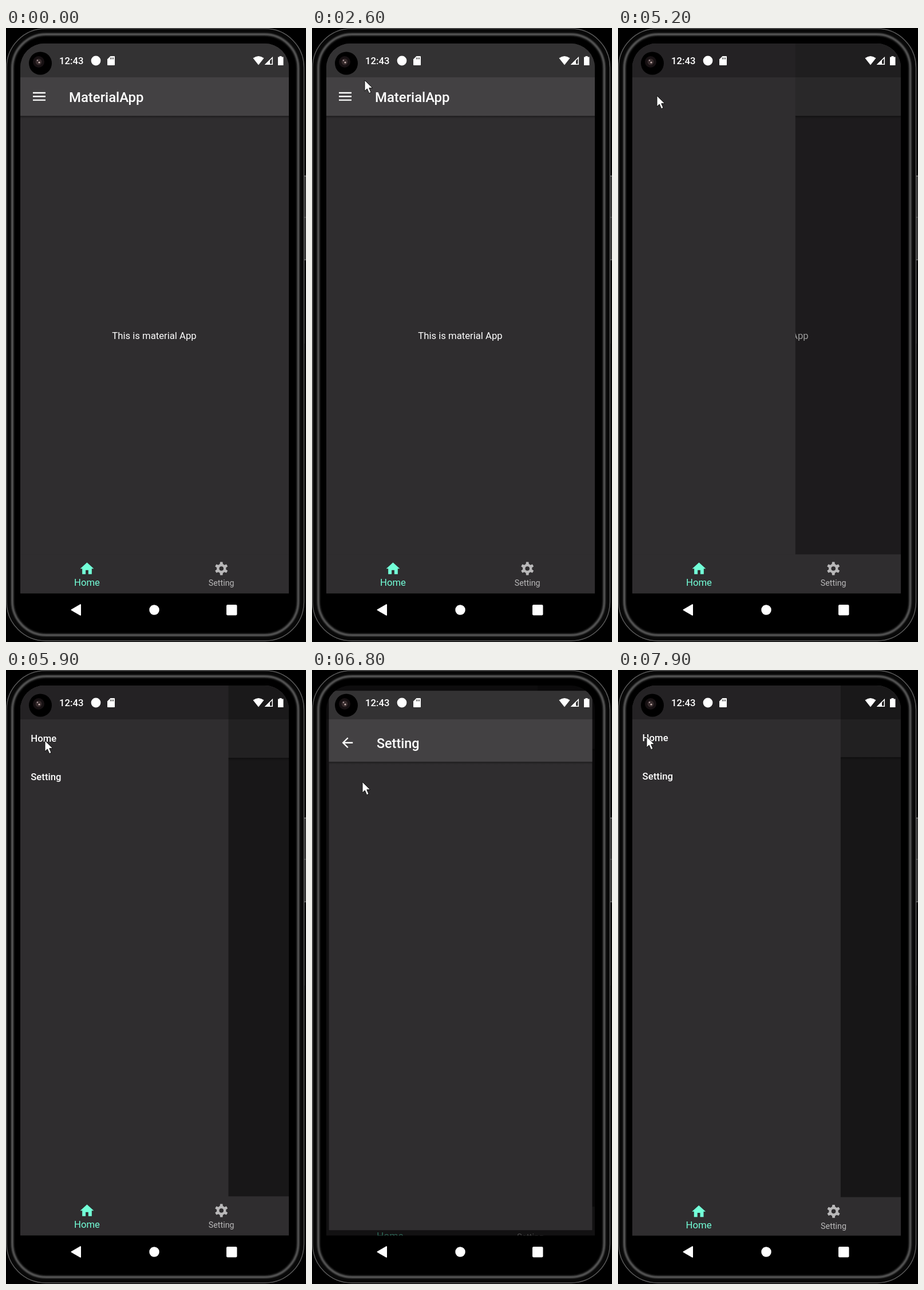
Animation, 524 px wide and 1070 px high, one loop 8000 ms. Source, as an HTML page:

```html
<!DOCTYPE html>
<html lang="en">
<head>
<meta charset="utf-8">
<title>Drawer and tabs</title>
<style>
  html, body { margin: 0; width: 100%; height: 100%; overflow: hidden; background: #000; }
  svg { display: block; font: 16.7px Roboto, sans-serif; fill: #fff; }
  .medium { font-weight: 500; }
  .title { font-weight: 500; font-size: 23.9px; }
  .surface { fill: #2f2d2f; }
  .header { fill: #434143; }
</style>
</head>
<body>
<svg width="524" height="1070">
  <defs>
    <clipPath id="screen"><path d="M25 985.5V69A42 42 0 0 1 67 27H452A42 42 0 0 1 494 69V985.5Z"/></clipPath>
    <linearGradient id="shade" x2="0" y2="1">
      <stop stop-opacity=".35"/><stop offset="1" stop-opacity="0"/>
    </linearGradient>
    <filter id="soft"><feGaussianBlur stdDeviation="1.3"/></filter>
    <path id="tooth" d="M-2.9 -6L-2.2 -11.4H2.2L2.9 -6Z"/>
  </defs>

  <!-- phone body -->
  <g fill="none">
    <rect x="1" y="1" width="519.5" height="1067" rx="68" fill="#080808" stroke="#5a5a5a" stroke-width="1.5"/>
    <rect x="11" y="11" width="499.5" height="1047" rx="59" stroke="#585858" stroke-width="4" filter="url(#soft)"/>
    <rect x="15.5" y="15.5" width="490.5" height="1038" rx="55" fill="#000"/>
    <path d="M522.5 257V329M522.5 331V404" stroke="#4a4a4a" stroke-width="2"/>
    <path d="M521 258H524M521 330H524M521 404H524" stroke="#999"/>
    <path d="M521.5 405V550" stroke="#222"/>
  </g>

  <g clip-path="url(#screen)">
    <g id="app">
      <rect class="surface" x="25" y="27" width="469" height="958.5"/>
      <rect class="header" x="25" y="27" width="469" height="126"/>
      <rect x="25" y="153" width="469" height="5" fill="url(#shade)"/>
      <path d="M47 113H69M47 119.3H69M47 125.6H69" stroke="#fff" stroke-width="2.4"/>
      <text class="title" x="110" y="128.5">MaterialApp</text>
      <text x="259" y="541.5" text-anchor="middle">This is material App</text>
      <rect id="scrim" x="25" y="27" width="469" height="890.5" fill="#000"/>
      <g id="drawer" class="medium">
        <rect class="surface" x="25" y="27" width="363.5" height="891"/>
        <text x="43.3" y="125">Home</text>
        <text x="43.3" y="192">Setting</text>
      </g>
      <rect class="surface" x="25" y="917.5" width="469" height="68"/>
      <g fill="#73ffd8">
        <path transform="translate(127.2 928) scale(1.19)" d="M10 20v-6h4v6h5v-8h3L12 3 2 12h3v8z"/>
        <text x="141.5" y="972" text-anchor="middle">Home</text>
      </g>
      <g fill="#b9b8b9">
        <g id="gear" transform="translate(376.2 942)">
          <circle r="6" fill="none" stroke="#b9b8b9" stroke-width="4.4"/>
        </g>
        <text x="376.2" y="972.3" text-anchor="middle" font-size="14.3">Setting</text>
      </g>
    </g>

    <g id="setting">
      <rect class="surface" x="25" y="27" width="469" height="958.5"/>
      <rect class="header" x="25" y="27" width="469" height="126"/>
      <rect x="25" y="153" width="469" height="5" fill="url(#shade)"/>
      <path transform="translate(43.7 105) scale(1.19)" d="M20 11H7.83l5.59-5.59L12 4l-8 8 8 8 1.41-1.41L7.83 13H20z"/>
      <text class="title" x="110" y="128.5">Setting</text>
    </g>

    <!-- status bar -->
    <rect x="25" y="27" width="469" height="59" fill="#000" opacity=".24"/>
    <text class="medium" x="93" y="63">12:43</text>
    <circle cx="157" cy="57" r="8.4"/>
    <path d="M182.500 49H189Q190 49 190 50V64Q190 65 189 65H178Q177 65 177 64V54.500Z"/>
    <path d="M182.500 51.500V54.500M185 51.500V54.500M187.500 51.500V54.500" stroke="#333" stroke-width="1.200"/>
    <path d="M431.500 52.500Q441 45.500 450.500 52.500L441 64.500Z"/>
    <path d="M453.500 63.300H465.300V51.500Z" fill="none" stroke="#fff" stroke-width="1.500"/>
    <path d="M452 64H461V55Z"/>
    <path d="M477.500 49H481.500V50.500H484.500V65H475V50.500H477.500Z"/>
  </g>

  <!-- camera -->
  <circle cx="60" cy="61.500" r="20" fill="#000"/>
  <circle cx="57" cy="59" r="10" fill="#171113"/>
  <circle cx="57" cy="59" r="5.500" fill="#352a2b"/>
  <circle cx="55" cy="56.500" r="1.200" fill="#a8979a"/>
  <circle cx="58" cy="60" r="1.600" fill="#c8b4b0"/>

  <!-- system navigation -->
  <path d="M114.500 1014L130 1005V1023Z" stroke="#fff" stroke-width="2" stroke-linejoin="round"/>
  <circle cx="259" cy="1014" r="8.700"/>
  <rect x="385" y="1005" width="18.500" height="18.500" rx="2"/>

  <path id="cursor" d="M0 0V19L4.300 14.900 7.700 22.700 11.100 21.200 7.800 13.600H13.800Z" stroke="#111"/>
</svg>
<script>
const $ = id => document.getElementById(id);
const clamp = v => Math.min(1, Math.max(0, v));
const LOOP = 8000, STEP = 100;

for (let a = 0; a < 360; a += 60)
  $('gear').insertAdjacentHTML('beforeend', `<use href="#tooth" transform="rotate(${a})"/>`);

// Pointer paths: [time, x, y]; hidden outside them
const paths = [
  [[2300, 36, 10], [2600, 92, 91], [2900, 361, 930], [3200, 361, 930], [3400, 388, 940]],
  [[3700, 342, 978], [3800, 342, 978], [3900, 340, 895], [4000, 336, 801], [4300, 180, 400],
   [4700, 68, 118], [5800, 68, 118], [5900, 68, 123], [6300, 88, 195], [6800, 88, 195],
   [7400, 50, 116], [LOOP, 50, 116]]
];

function pointer(t) {
  const path = paths.find(p => t >= p[0][0] && t <= p.at(-1)[0]);
  if (!path) return null;
  const i = Math.max(1, path.findIndex(k => k[0] >= t));
  const [a, b] = [path[i - 1], path[i]];
  const u = (t - a[0]) / (b[0] - a[0]);
  return [a[1] + (b[1] - a[1]) * u, a[2] + (b[2] - a[2]) * u];
}

const bezier = (a, b, c, d, u) => {
  const v = 1 - u;
  return a * v * v * v + 3 * b * u * v * v + 3 * c * u * u * v + d * u * u * u;
};

// Fast start with a long slow tail, in two curve segments
function emphasize(x) {
  if (x <= 0 || x >= 1) return clamp(x);
  const [px, py] = x < 1 / 6
    ? [[0, .05, .1333, 1 / 6], [0, 0, .06, .4]]
    : [[1 / 6, .2083, .25, 1], [.4, .82, 1, 1]];
  let lo = 0, hi = 1;
  for (let n = 0; n < 20; n++) {
    const mid = (lo + hi) / 2;
    if (bezier(...px, mid) < x) lo = mid; else hi = mid;
  }
  return bezier(...py, lo);
}

const spring = s => s > 0 ? 1 - (1 + s) * Math.exp(-s) : 0;

function showPage(id, scale, opacity) {
  $(id).setAttribute('transform', `translate(259.5 506) scale(${scale}) translate(-259.5 -506)`);
  $(id).setAttribute('opacity', opacity);
}

function draw(t) {
  const open = spring((t - 5030) * .017);
  $('drawer').setAttribute('transform', `translate(${(open - 1) * 364} 0)`);
  $('scrim').setAttribute('opacity', open / 2);

  const enter = t - 6650, leave = t - 7640;
  if (leave < 0) {
    const p = emphasize(enter / 450);
    showPage('app', 1 + .05 * p, clamp(1 - (enter - 50) / 166));
    showPage('setting', .85 + .15 * p, clamp((enter - 50) / 83));
  } else {
    const p = emphasize(leave / 450);
    showPage('app', 1.1 - .1 * p, 1);
    showPage('setting', 1 - .1 * p, clamp(1 - (leave - 35) / 83));
  }

  const at = pointer(t);
  $('cursor').setAttribute('visibility', at ? 'visible' : 'hidden');
  if (at) $('cursor').setAttribute('transform', `translate(${at})`);
}

function tick() {
  draw(Math.floor(performance.now() % LOOP / STEP) * STEP);
  requestAnimationFrame(tick);
}
tick();
</script>
</body>
</html>
```
